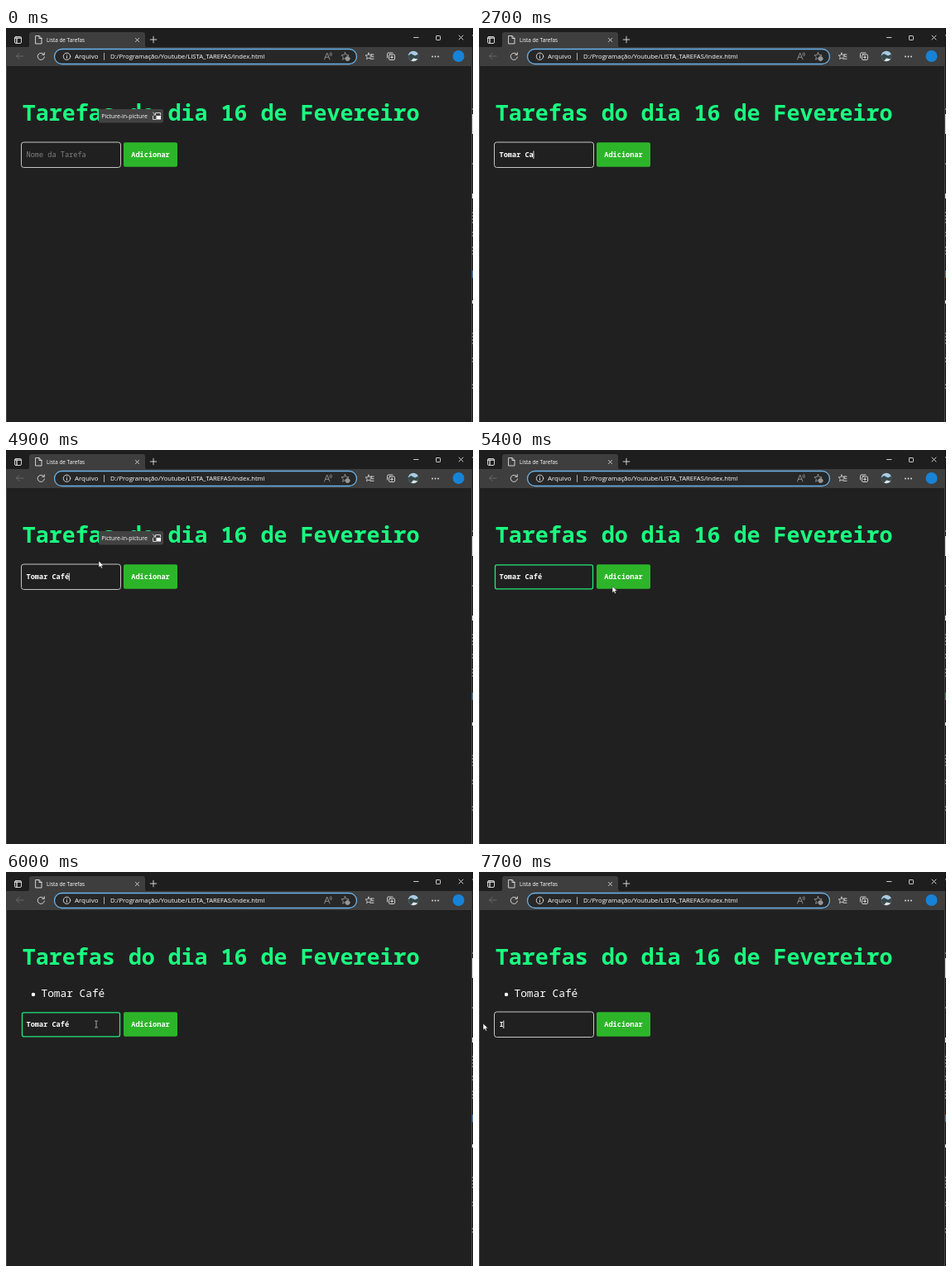
These frames come from a looping animation (564x476 px, 8 s). An HTML page:

```html
<!DOCTYPE html>
<html lang="pt-BR">
<head>
<meta charset="utf-8">
<title>Lista de Tarefas</title>
<style>
  html, body { margin: 0; width: 100%; height: 100%; overflow: hidden; background: #202020; }
  svg { display: block; width: 564px; height: 476px; }
  text { white-space: pre; fill: #fff; }
  .ui { font-family: "Open Sans", "Noto Sans", sans-serif; font-weight: 500; }
  .mono { font-family: "Noto Sans Mono", "DejaVu Sans Mono", monospace; }
  .small { font-size: 8.6px; font-weight: 600; }
  .line { fill: none; stroke: #e4e4e4; stroke-width: .9; stroke-linecap: round; stroke-linejoin: round; }
  .dim { stroke: #969696; }
</style>
</head>
<body>
<svg viewBox="0 0 564 476">
  <defs>
    <path id="star" d="M0-4.6 1.3-1.5 4.6-1.2 2.1 1 2.9 4.3 0 2.5-2.9 4.3-2.1 1-4.6-1.2-1.3-1.5Z"/>
    <clipPath id="round"><circle cx="492" cy="34" r="6.2"/></clipPath>
  </defs>
  <rect width="564" height="476" fill="#202020"/>

  <!-- title bar and tab -->
  <rect width="564" height="24" fill="#1e1e1e"/>
  <rect y="23" width="564" height="23" fill="#3e3e3e"/>
  <path d="M25 23.5Q28 23.5 28 20V8Q28 5 31 5H165Q168 5 168 8V20Q168 23.5 171 23.5Z" fill="#3e3e3e"/>
  <g class="line">
    <rect x="10.5" y="10.5" width="8" height="8" rx="1.5"/>
    <path d="M10.5 12.2H18.5M13 12V18" stroke-width="1.3"/>
    <path d="M36 9.5H40L43 12.5V19H36ZM40 9.5V12.5H43"/>
    <path d="M156.5 12.5 160.5 16.5M160.5 12.5 156.5 16.5M178 10.2V17.8M174.2 14H181.8"/>
    <path d="M492.5 11.5H498M547 9 552 14M552 9 547 14"/>
    <rect x="519.5" y="9.5" width="5" height="5" rx=".7"/>
  </g>
  <text class="ui" x="49" y="16.8" font-size="6.4">Lista de Tarefas</text>

  <!-- toolbar -->
  <rect x="58.5" y="25.5" width="365" height="18" rx="9" fill="#272727" stroke="#6bb3ea" stroke-width="1.3"/>
  <path class="line" style="stroke:#6c6c6c" d="M21 34H12.5M16 30.5 12.5 34 16 37.5"/>
  <g class="line">
    <path d="M45.7 32A4.1 4.1 0 1 0 46.4 35M46.3 29.8V32.3H43.8"/>
    <circle cx="73.5" cy="34.3" r="4.2"/>
    <path d="M73.5 34V36.5M73.5 32.1V32.2"/>
    <path d="M118.5 30.5V38.5" stroke-width=".7"/>
  </g>
  <text class="ui" x="83" y="37.3" font-size="7.9">Arquivo</text>
  <text class="ui" x="126" y="37.3" font-size="7.67">D:/Programação/Youtube/LISTA_TAREFAS/index.html</text>
  <g class="line dim">
    <path d="M384.5 38 387.7 30 391 38M385.6 35.3H389.7M391 30.5Q392.3 31.7 391 33M392.6 29.6Q394.5 31.7 392.6 33.9"/>
    <use href="#star" x="409.5" y="34"/>
    <circle cx="412.5" cy="37" r="2.6" fill="#969696"/>
  </g>
  <g class="line">
    <use href="#star" transform="translate(438 34) scale(.85)"/>
    <path d="M440.5 32H444M441.5 34.7H444M441.5 37.3H444"/>
    <rect x="462.5" y="32" width="7" height="6.5" rx="1.3"/>
    <path d="M460.5 36V31.5Q460.5 30 462 30H467M466 33.7V36.8M464.4 35.3H467.6"/>
  </g>
  <g clip-path="url(#round)">
    <rect x="485" y="27" width="14" height="14" fill="#a9cbe4"/>
    <path d="M485 34 489 31 494 33.5 499 31V41H485Z" fill="#37484a"/>
    <path d="M488 41 492 36.5 499 38V41Z" fill="#dce5ea"/>
  </g>
  <g fill="#e4e4e4"><circle cx="515" cy="34.5" r=".9"/><circle cx="518.5" cy="34.5" r=".9"/><circle cx="522" cy="34.5" r=".9"/></g>
  <circle cx="546.5" cy="34" r="7" fill="#1683d8"/>

  <!-- window edges and the sliver of the window behind -->
  <path d="M.5 46V476M562.5 46V476" stroke="#484848"/>
  <path d="M563.5 0V476" stroke="#151515"/>
  <path d="M563.5 8V12M563.5 97V99M563.5 163V167M563.5 222V238M563.5 246V252M563.5 264V276M563.5 368V382M563.5 398V404M563.5 430V438" stroke="#707070" stroke-dasharray="2 2"/>
  <path d="M563.5 293V302" stroke="#3b6ea0"/>
  <path d="M563.5 104V128M563.5 200V206M563.5 329V333" stroke="#e8e8e8"/>

  <!-- page -->
  <text class="mono" x="19.7" y="111.5" font-size="26.67" font-weight="700" style="fill:#1aff80">Tarefas do dia 16 de Fevereiro</text>
  <g id="item">
    <circle cx="33" cy="148" r="2.2" fill="#fff"/>
    <text class="mono" x="42.5" y="151.3" font-size="12.8" font-weight="500">Tomar Café</text>
  </g>
  <g id="form">
    <rect id="field" fill="#202020"/>
    <rect id="selection" y="148" height="11" fill="#3390ff"/>
    <text id="hint" class="mono" x="24.5" y="156" font-size="8.6" style="fill:#808080">Nome da Tarefa</text>
    <text id="value" class="mono small" x="24.5" y="156"></text>
    <rect id="caret" y="148.5" width=".9" height="9.5" fill="#fff"/>
    <rect x="142" y="138.3" width="65" height="29.5" rx="2" fill="#2db52a"/>
    <text class="mono" x="151.3" y="156" font-size="8.6" font-weight="700">Adicionar</text>
  </g>
  <g id="tooltip">
    <rect x="112" y="98" width="78" height="16.5" rx="2" fill="#424242"/>
    <text class="ui" x="115.3" y="108.8" font-size="6.95">Picture-in-picture</text>
    <path class="line" d="M181 102.5H186.5V105M177.5 106.5V110.5H181M177.5 102 180.5 105M180.5 103V105H178.5"/>
    <rect x="181.5" y="106" width="5.5" height="4.5" fill="#fff"/>
  </g>
  <path id="arrow" d="M0 0V8L1.9 6.3 3.1 9 4.5 8.4 3.4 5.8H5.9Z" fill="#fff" stroke="#111" stroke-width=".5"/>
  <path id="beam" d="M-1.8-4H-.5L0-3.6 .5-4H1.8M0-3.6V3.6M-1.8 4H-.5L0 3.6 .5 4H1.8" fill="none" stroke="#c8c8c8" stroke-width=".8"/>
</svg>
<script>
const LOOP = 8000, TICK = 100, LEFT = 24.5, ADVANCE = 8.6 * 0.6;
const TASK = 'Tomar Café';
const $ = id => document.getElementById(id);

// Step tables: [start ms, value]
const typed = [[0, ''], [600, 1], [1000, 2], [1200, 3], [1300, 4], [1400, 5], [1700, 6],
  [2100, 7], [2700, 8], [2900, 9], [3500, 10], [7700, 'I']]
  .map(([t, v]) => [t, typeof v === 'number' ? TASK.slice(0, v) : v]);
const caretOn = [[0, false], [200, true], [4000, false], [4500, true], [5000, false],
  [6200, true], [6300, false], [7700, true]];
const tooltipOn = [[0, true], [800, false], [4800, true], [5200, false]];
const focused = [[0, true], [5400, false], [6200, true]];
const selectedFrom = [[0, 10], [6400, 8], [6500, 3], [6600, 0], [7700, 10]];
const pointer = [
  [0, null],
  [4500, ['beam', 39, 109]], [4600, ['arrow', 60, 119]],
  [4800, ['arrow', 82, 126]], [4900, ['arrow', 112, 134]], [5000, ['arrow', 138, 147]],
  [5100, ['arrow', 154, 159]], [5200, ['arrow', 161, 164.5]],
  [5700, ['arrow', 159, 168]], [5800, ['arrow', 148, 176]],
  [5900, ['beam', 125, 182]], [6000, ['beam', 109, 184]],
  [6300, ['beam', 92, 184]], [6400, ['beam', 66, 184]], [6500, ['beam', 40, 184]],
  [6600, ['beam', 16, 184]], [6700, ['arrow', 5, 183]]
];

const at = (steps, t) => steps.findLast(([start]) => start <= t)[1];
const show = (id, on) => $(id).setAttribute('visibility', on ? 'visible' : 'hidden');
function set(id, attrs) {
  for (const key in attrs) $(id).setAttribute(key, attrs[key]);
}

function draw(t) {
  const text = at(typed, t), added = t >= 5500;
  show('item', added);
  set('form', { transform: `translate(0 ${added ? 31 : 0})` });
  set('field', at(focused, t)
    ? { x: 18.5, y: 138, width: 120, height: 30.5, rx: 3, stroke: '#d8d8d8', 'stroke-width': 0.9 }
    : { x: 19.5, y: 138.8, width: 118, height: 29, rx: 2, stroke: '#25e87c', 'stroke-width': 1.3 });

  $('value').textContent = text;
  show('hint', !text);
  show('caret', at(caretOn, t));
  set('caret', { x: LEFT + text.length * ADVANCE - 0.3 });

  const from = at(selectedFrom, t);
  show('selection', from < TASK.length);
  set('selection', { x: LEFT + from * ADVANCE, width: (TASK.length - from) * ADVANCE });

  show('tooltip', at(tooltipOn, t));
  const [kind, x, y] = at(pointer, t) || [];
  for (const id of ['arrow', 'beam']) show(id, id === kind);
  if (kind) set(kind, { transform: `translate(${x} ${y})` });
}

const start = performance.now();
function frame() {
  const t = (performance.now() - start) % LOOP;
  draw(Math.floor(t / TICK) * TICK);
  requestAnimationFrame(frame);
}
frame();
</script>
</body>
</html>
```
